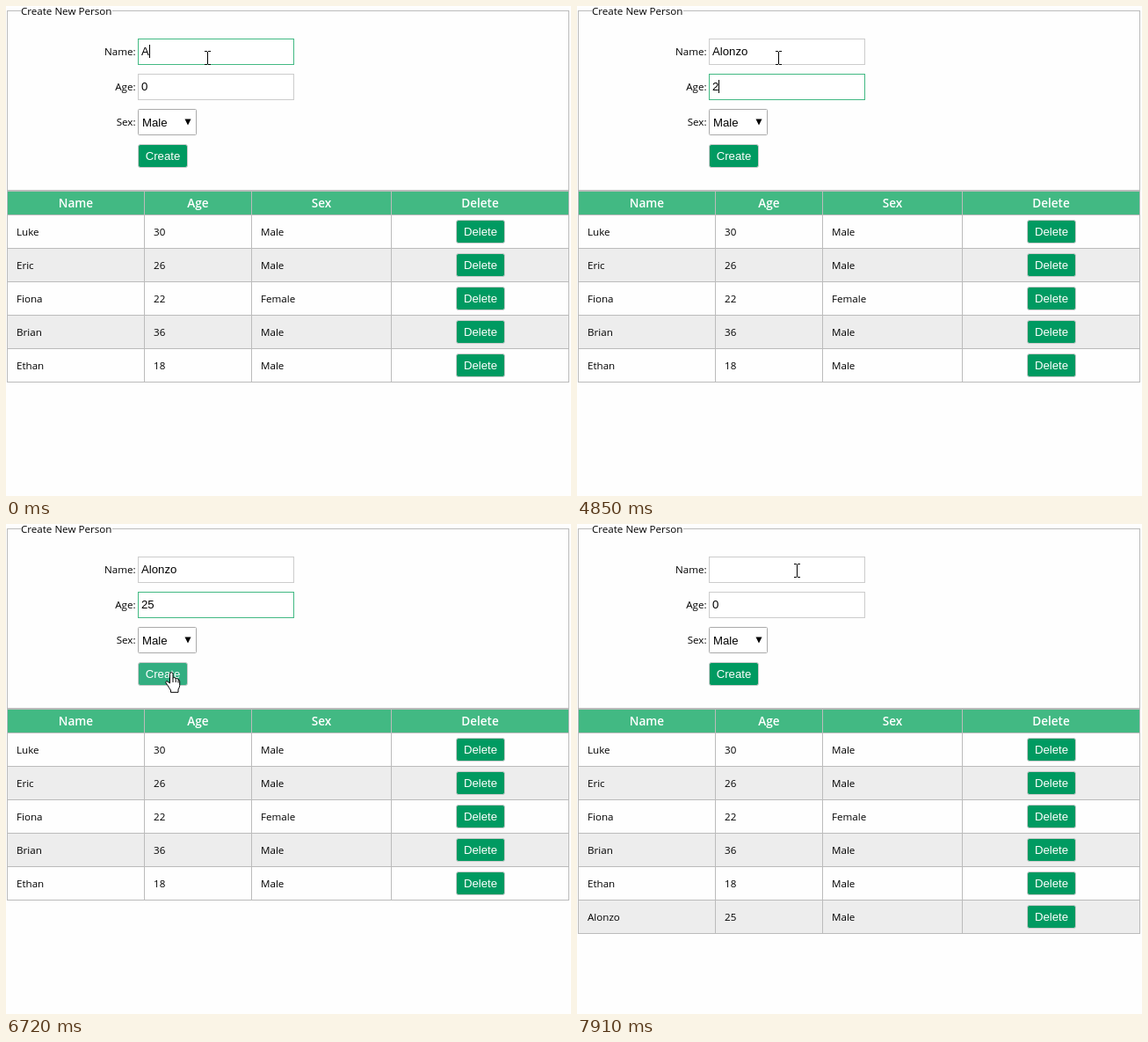
Recreate the animation shown at these times as an HTML page. Size 643 by 557 pixels, loop 8 s.

```html
<!DOCTYPE html>
<html lang="en">
<head>
<meta charset="utf-8">
<title>Create New Person</title>
<style>
  html, body { margin: 0; width: 100%; height: 100%; overflow: hidden; background: #fefefe; }
  svg { display: block; width: 643px; height: 557px; }
  text { font: 11.6px "Open Sans", "Noto Sans", sans-serif; white-space: pre; }
  .control { font: 13.2px "Liberation Sans", Arial, sans-serif; }
  .head { font-size: 13.6px; font-weight: 600; }
</style>
</head>
<body>
<svg id="stage" viewBox="0 0 643 557"></svg>
<script>
const LOOP = 8000;
const GREEN = '#42b983', GREY = '#bbb';
const NEW_NAME = 'Alonzo';
const people = [
  ['Luke', 30, 'Male'], ['Eric', 26, 'Male'], ['Fiona', 22, 'Female'],
  ['Brian', 36, 'Male'], ['Ethan', 18, 'Male']
];

// Each step overrides part of the state that came before it.
const steps = [
  [0, { name: NEW_NAME.slice(0, 1), age: '0', focus: 'name', caret: true, cursor: ['beam', 229, 51] }],
  ...[250, 530, 930, 1080, 1580].map((time, i) => [time, { name: NEW_NAME.slice(0, i + 2) }]),
  [2010, { focus: 'age', caret: false, selected: true }],
  [4850, { age: '2', caret: true, selected: false }],
  [5380, { caret: false }],
  [5940, { age: '25', caret: true }],
  [6060, { cursor: ['beam', 229, 90] }],
  [6210, { cursor: ['arrow', 219, 109] }],
  [6330, { cursor: ['arrow', 215, 118], hover: 'select' }],
  [6450, { cursor: ['arrow', 209, 128], caret: false }],
  [6600, { cursor: ['arrow', 197, 156], hover: '' }],
  [6720, { cursor: ['hand', 181, 168], hover: 'create' }],
  [6840, { cursor: ['hand', 176, 171] }],
  [6960, { focus: '' }],
  [7110, { name: '', age: '0', added: true }],
  [7670, { cursor: ['arrow', 222, 139], hover: '' }],
  [7790, { cursor: ['arrow', 249, 107] }],
  [7910, { cursor: ['beam', 250, 45] }]
];

const cursors = {
  beam: '<path d="M-3 .5h3m1 0h3M.5 1v14M-3 15.5h3m1 0h3" fill="none" stroke="#000"/>',
  arrow: '<path d="M.5 .5V16.5L4.2 13 7 19 9.5 18 6.8 12H11.7Z" fill="#fff" stroke="#000"/>',
  hand: `<path d="M5.5 13V2.5Q5.5 .7 7.2 .7T9 2.5V7.5Q9 6.3 10.6 6.5T12.2 8.3Q12.4 7.3 13.8 7.6T15 9.2
    Q16.5 8.8 16.7 10.8V15.5Q16.5 18 15 20V23.3H6.5V21Q4.7 18.5 3 15.5L1 12.8Q.4 11.2 1.8 10.7Q3.2 10.6 4 12Z"
    fill="#fff" stroke="#000"/><path d="M9 7.5V12M12.2 8.5V12M15 9.5V12.5" stroke="#000" fill="none"/>`
};

const pen = document.createElement('canvas').getContext('2d');
pen.font = '13.2px "Liberation Sans", Arial, sans-serif';
const widthOf = text => pen.measureText(text).width;

const rect = (x, y, w, h, fill) => `<rect x="${x}" y="${y}" width="${w}" height="${h}" fill="${fill}"/>`;
const box = (x, y, w, h, stroke, fill = '#fff', radius = 0) =>
  `<rect x="${x + .5}" y="${y + .5}" width="${w - 1}" height="${h - 1}" rx="${radius}" fill="${fill}" stroke="${stroke}"/>`;
const label = (text, x, y, { anchor = 'start', kind = '', fill = '#000' } = {}) =>
  `<text x="${x}" y="${y}" text-anchor="${anchor}" class="${kind}" fill="${fill}">${text}</text>`;
const button = (text, x, y, w, fill = '#009a61') =>
  box(x, y, w, 27, '#ccc', fill, 2.5) +
  label(text, x + w / 2, y + 18, { anchor: 'middle', kind: 'control', fill: '#fff' });

function input(text, y, focused, state) {
  const selected = focused && state.selected;
  return box(150, y, 178, 30, focused ? GREEN : '#ccc') +
    (selected ? rect(154, y + 7, 7, 15, '#39f') : '') +
    label(text, 154, y + 19, { kind: 'control', fill: selected ? '#fff' : '#000' }) +
    (focused && state.caret ? rect(Math.round(154 + widthOf(text)), y + 7, 1, 15, '#000') : '');
}

function form(state) {
  const right = { anchor: 'end' };
  return rect(1, 5, 16, 1, GREY) + rect(121, 5, 520, 1, GREY) + rect(1, 5, 1, 205, GREY) +
    rect(640, 5, 1, 205, GREY) + rect(1, 209, 640, 1, GREY) +
    label('Create New Person', 17, 10) +
    label('Name:', 147.5, 56, right) + label('Age:', 147.5, 96, right) + label('Sex:', 147.5, 136, right) +
    input(state.name, 37, state.focus === 'name', state) +
    input(state.age, 77, state.focus === 'age', state) +
    box(150, 117, 67, 30, state.hover === 'select' ? '#888' : '#aaa', '#fff', 1) +
    label('Male', 155, 137, { kind: 'control' }) +
    '<path d="M203.5 128.5h7l-3.5 7z"/>' +
    button('Create', 150, 157, 57, state.hover === 'create' ? '#33ae81' : undefined);
}

function table(rows) {
  const bottom = 237 + 38 * rows.length;
  const head = { anchor: 'middle', kind: 'head', fill: '#fff' };
  return rect(1, 211, 640, 26, GREEN) +
    [['Name', 79.5], ['Age', 218.5], ['Sex', 359], ['Delete', 539.5]].map(([text, x]) => label(text, x, 229, head)).join('') +
    rows.map(([name, age, sex], i) => {
      const y = 238 + 38 * i;
      return rect(1, y, 640, 37, i % 2 ? '#ededed' : '#fefefe') + rect(1, y + 37, 640, 1, GREY) +
        label(name, 12, y + 23) + label(age, 168, y + 23) + label(sex, 290, y + 23) +
        button('Delete', 512, y + 5, 56);
    }).join('') +
    rect(1, 210, 640, 1, GREY) + rect(1, 237, 640, 1, GREY) +
    [1, 157, 279, 438, 640].map(x => rect(x, 210, 1, bottom - 209, GREY)).join('');
}

const stage = document.getElementById('stage');
const start = performance.now();
let shown = 0;

function draw() {
  const time = (performance.now() - start) % LOOP;
  const past = steps.filter(([at]) => at <= time);
  if (past.length !== shown) {
    shown = past.length;
    const state = Object.assign({}, ...past.map(([, change]) => change));
    const [shape, x, y] = state.cursor;
    stage.innerHTML = form(state) +
      table(state.added ? [...people, [NEW_NAME, 25, 'Male']] : people) +
      `<g transform="translate(${x} ${y})">${cursors[shape]}</g>`;
  }
  requestAnimationFrame(draw);
}
draw();
</script>
</body>
</html>
```
